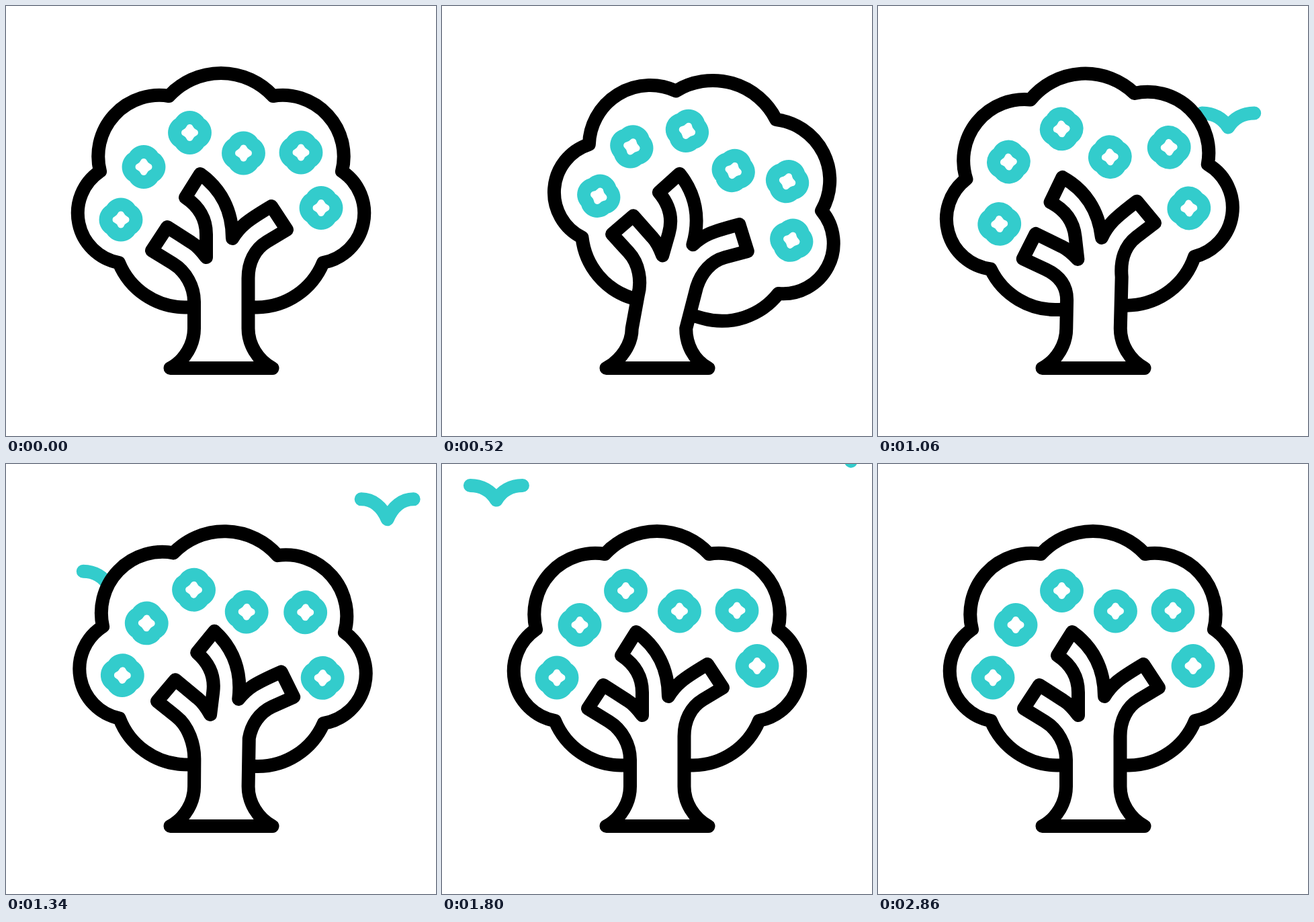
An HTML page for the animation above (3.6 s loop, 640 by 640 pixels).

```html
<!DOCTYPE html>
<html lang="en">
<head>
<meta charset="utf-8">
<title>Swaying tree</title>
<style>
  html, body { margin: 0; width: 100%; height: 100%; overflow: hidden; background: #fff; }
  svg { display: block; width: 100vw; height: 100vh; }
  path { fill: #fff; stroke: #000; stroke-width: 20; stroke-linecap: round; stroke-linejoin: round; }
  .bird, .fruit { stroke: #3cc; }
  .bird { fill: none; }
</style>
</head>
<body>
<svg viewBox="0 0 640 640">
  <path class="bird"/>
  <path class="bird"/>
  <g id="crown">
    <path d="M266 448.5A107 107 0 0 1 168 382A75 75 0 0 1 140 246A91 91 0 0 1 242.5 134
             A105.3 105.3 0 0 1 397.5 134A91 91 0 0 1 500 246A75 75 0 0 1 472 382A107 107 0 0 1 374 448.5Z"/>
  </g>
  <path id="trunk"/>
</svg>
<script>
const LOOP = 3600;
const TIMES = [0, 300, 540, 740, 920, 1060, 1340, 1640];

// Pose curves, one value per entry of TIMES
const POSE = {
  crownX: [0, 39.6, 69, 29.3, -26, -8.25, 3.75, 0],
  crownY: [0, 3.7, 9, 3.3, 2, 0.5, 0.25, 0],
  crownTurn: [0, 10, 16, 10.7, -8, -3.5, 1.4, 0],
  branchX: [0, 18, 25, 2.5, -7, 1, 4, 0],
  branchY: [0, 1.5, 3, 3.5, 1, 0.5, 1.5, 0],
  branchTurn: [0, 11, 16, 7.2, -9, -6.5, 7, 0],
  stemTurn: [0, 11, 15, -3, -6, 1.5, 0.5, 0]
};

// Rest place, wobble direction, and wobble strength at the four middle times
const FRUITS = [
  { at: [171, 318], dir: [14, -3], amp: [0.57, 0, 1, 0] },
  { at: [205, 239.5], dir: [-1.5, -15], amp: [1, 0.07, 1, 0] },
  { at: [273.5, 188.5], dir: [12, -9], amp: [0.3, 0.1, 1, 0.05] },
  { at: [353.5, 219], dir: [4, 12], amp: [1, 0.35, 0.6, 0] },
  { at: [439, 218], dir: [5, -1], amp: [0, 0.6, 1, 0.4] },
  { at: [469, 300.5], dir: [-0.5, 14], amp: [0, 0.93, 0.65, 1] }
];
const FRUIT_PATH = "M-13.65-13.65A15 15 0 0 1 13.65-13.65A15 15 0 0 1 13.65 13.65" +
  "A15 15 0 0 1-13.65 13.65A15 15 0 0 1-13.65-13.65Z";

// Each bird passes `at` at time `t0` and glides out with slowing speed
const BIRDS = [
  { show: 800, t0: 1060, at: [521, 181], way: [121.5, -257], beat: 1340 },
  { show: 1100, t0: 1340, at: [154, 183], way: [-133.3, -236], beat: 1550 }
];
const GLIDE = 580, FLAP = 600;

// Cubic through the keys, flat at every turning point
function curve(keys, t) {
  const last = TIMES.length - 1;
  if (t >= TIMES[last]) return keys[last];
  const slope = i => (keys[i + 1] - keys[i]) / (TIMES[i + 1] - TIMES[i]);
  const tangent = i => {
    if (i === 0 || i === last || slope(i - 1) * slope(i) <= 0) return 0;
    return (keys[i + 1] - keys[i - 1]) / (TIMES[i + 1] - TIMES[i - 1]);
  };
  let i = 0;
  while (t >= TIMES[i + 1]) i++;
  const span = TIMES[i + 1] - TIMES[i], u = (t - TIMES[i]) / span, v = 1 - u;
  return keys[i] * v * v * (1 + 2 * u) + keys[i + 1] * u * u * (3 - 2 * u) +
    span * u * v * (tangent(i) * v - tangent(i + 1) * u);
}

function turner(px, py, degrees, dx = 0, dy = 0) {
  const a = degrees * Math.PI / 180, c = Math.cos(a), s = Math.sin(a);
  return (x, y) => {
    x -= px;
    y -= py;
    return [px + dx + x * c - y * s, py + dy + x * s + y * c];
  };
}

function trunkPath(p) {
  const stem = turner(320, 480, p.stemTurn);
  const branch = turner(320, 390, p.branchTurn, p.branchX, p.branchY);
  const text = point => point.map(v => v.toFixed(2)).join(" ") + " ";
  const s = (x, y) => text(stem(x, y));
  const b = (x, y) => text(branch(x, y));
  // The right shoulder sits between stem and branches
  const mid = (x, y) => {
    const end = branch(x, y);
    return text(stem(x, y).map((v, i) => (v + end[i]) / 2));
  };
  const shift = p.stemTurn * 0.18, left = 280 + shift, right = 360.5 + shift;
  return `M244.5 539C267 527 ${left} 503 ${left} 480L` + s(280, 440) +
    "C" + s(280, 418) + b(268, 395) + b(248, 383) +
    "L" + b(217, 364) + "L" + b(240, 329) +
    "L" + b(276, 352) + "Q" + b(286, 358) + b(298, 374) +
    "L" + b(298, 340) + "C" + b(298, 315) + b(285, 297) + b(267, 285) +
    "L" + b(289, 250) + "C" + b(320, 272) + b(337, 305) + b(337, 346) +
    "C" + b(348, 328) + b(358, 320) + b(395, 298) +
    "L" + b(418, 333) + "L" + b(388, 351) +
    "C" + b(370, 362) + b(360.5, 382) + mid(360.5, 405) +
    `L${right} 480C${right} 503 374 527 396.5 539Z`;
}

const crown = document.getElementById("crown");
const trunk = document.getElementById("trunk");
const birds = document.querySelectorAll(".bird");

for (const fruit of FRUITS) {
  fruit.el = document.createElementNS("http://www.w3.org/2000/svg", "path");
  fruit.el.setAttribute("class", "fruit");
  fruit.el.setAttribute("d", FRUIT_PATH);
  fruit.keys = [0, fruit.amp[0], fruit.amp[0] / 2, fruit.amp[1],
    (fruit.amp[1] + fruit.amp[2]) / 2, fruit.amp[2], fruit.amp[3], 0];
  crown.append(fruit.el);
}

function drawBird(el, bird, t) {
  const seen = t >= bird.show && t < 2400;
  el.style.display = seen ? "" : "none";
  if (!seen) return;
  const gone = 1 - Math.exp((bird.t0 - t) / GLIDE);
  const [x, y] = bird.at.map((v, i) => v + bird.way[i] * gone);
  const d = 25.5 + 4.5 * Math.cos((t - bird.beat) / FLAP * 2 * Math.PI);
  const bend = d * 0.62;
  el.setAttribute("d", `M-39 ${-d}C-22 ${-d} -8 ${-bend} 0 0C8 ${-bend} 22 ${-d} 39 ${-d}`);
  el.setAttribute("transform", `translate(${x} ${y})`);
}

function draw(t) {
  const p = {};
  for (const name in POSE) p[name] = curve(POSE[name], t);
  crown.setAttribute("transform",
    `translate(${p.crownX} ${p.crownY}) rotate(${p.crownTurn} 320 258)`);
  trunk.setAttribute("d", trunkPath(p));
  const unturn = turner(0, 0, -p.crownTurn);
  for (const { el, at, dir, keys } of FRUITS) {
    const k = curve(keys, t);
    const [dx, dy] = unturn(dir[0] * k, dir[1] * k);
    el.setAttribute("transform", `translate(${at[0] + dx} ${at[1] + dy})`);
  }
  birds.forEach((el, i) => drawBird(el, BIRDS[i], t));
}

const start = performance.now();
function tick() {
  draw((performance.now() - start) % LOOP);
  requestAnimationFrame(tick);
}
tick();
</script>
</body>
</html>
```
